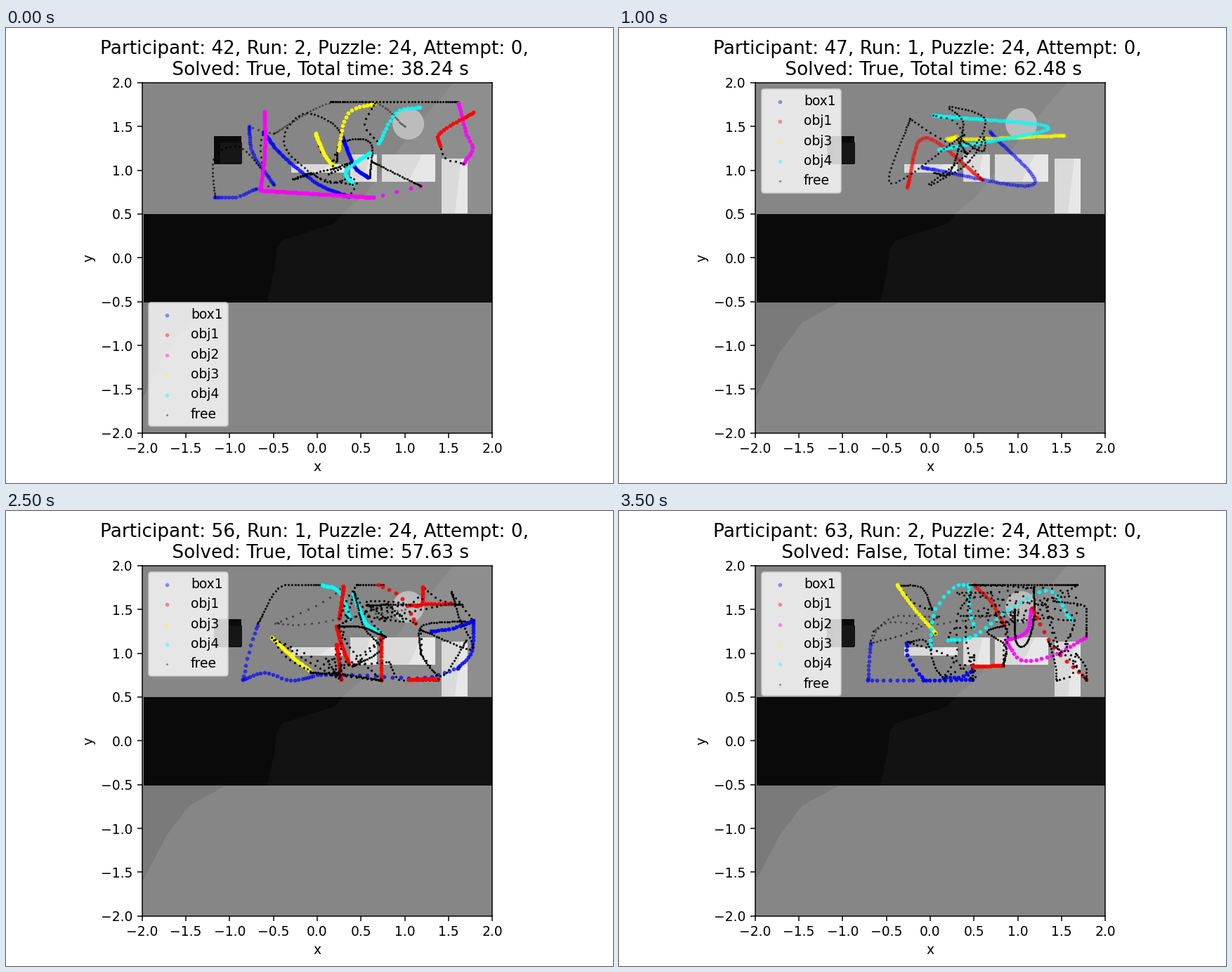
These frames come from a looping animation (864x648 px, 4 s). A matplotlib script:

```python
import numpy as np
import matplotlib.pyplot as plt
from matplotlib.animation import FuncAnimation

COLORS = {"box1": "blue", "obj1": "red", "obj2": "magenta",
          "obj3": "yellow", "obj4": "cyan", "free": "black"}
LOW, HIGH = (-1.2, .69), (1.78, 1.78)  # reachable area
UNIT = 124.7  # pixels per data unit

fig = plt.figure(figsize=(6.4, 4.8), dpi=135)
ax = fig.add_axes((193.6 / 864, 71.3 / 648, 498.8 / 864, 498.8 / 648))


def dots(name, x, y, alpha):
    size = .6 if name == "free" else 4.5
    return ax.scatter(x, y, s=size, color=COLORS[name], alpha=alpha)


def spline(p, steps=12):
    """Catmull-Rom curve through the points."""
    q = np.vstack([2 * p[0] - p[1], p, 2 * p[-1] - p[-2]])
    t = np.linspace(0, 1, steps, endpoint=False)[:, None]
    parts = []
    for a, b, c, d in zip(q, q[1:], q[2:], q[3:]):
        parts.append(b + t * (c - a) / 2 + t**2 * (2 * a - 5 * b + 4 * c - d) / 2
                     + t**3 * (3 * b - a - 3 * c + d) / 2)
    return np.vstack(parts + [p[-1:]])


class Hand:
    """Moves through the room and leaves dots that grow darker with time."""

    def __init__(self, seed):
        self.rng = np.random.default_rng(seed)
        self.at = np.array([1, 1.5])
        self.alpha = .35

    def trail(self, name, gap, points):
        p = spline(np.array(points, float))
        dist = np.r_[0, np.cumsum(np.hypot(*np.diff(p, axis=0).T))]
        u = np.linspace(0, 1, max(3, round(dist[-1] * UNIT / gap)))
        s = dist[-1] * (u + u * u * (3 - 2 * u)) / 2  # slower at both ends
        x = np.clip(np.interp(s, dist, p[:, 0]), LOW[0], HIGH[0])
        y = np.clip(np.interp(s, dist, p[:, 1]), LOW[1], HIGH[1])
        dots(name, x, y, self.alpha)
        self.at = p[-1]

    def move(self, name, gap, *points):
        """Reach for the first point when it is near, then follow the rest."""
        start = np.array(points[0], float)
        if .1 < np.hypot(*(start - self.at)) < 1:
            mid = (start + self.at) / 2 + self.rng.normal(0, .06, 2)
            self.trail("free", 6, [self.at, mid, start])
        self.trail(name, gap, points)
        self.alpha = min(.85, self.alpha + .07)

    def wander(self, name, gap, low, high, count):
        self.move(name, gap, *self.rng.uniform(low, high, (count, 2)))


def run_a(hand):
    move = hand.move
    move("free", 4, (1, 1.5), (.65, 1.78), (.1, 1.76), (-.5, 1.42))
    move("box1", 3, (-.78, 1.5), (-.74, 1.2), (-.5, .84))
    move("box1", 4, (-.7, .79), (-.95, .69), (-1.17, .69))
    move("free", 5, (-1.17, .69), (-1.18, 1.15), (-.9, 1.27), (-.62, 1))
    move("box1", 3, (-.62, 1.44), (-.4, 1.17), (0, .85), (.36, .7))
    move("free", 5, (.38, .92), (.1, .87), (-.33, 1.2), (-.36, 1.45),
         (-.15, 1.65), (.15, 1.55), (.28, 1.4))
    move("box1", 2, (.28, 1.4), (.42, 1.05), (.58, .92))
    move("free", 3, (.6, .92), (.6, 1.32), (.27, 1.32), (.22, 1.1))
    move("obj3", 2, (-.02, 1.42), (.07, 1.2), (.18, 1.05))
    move("obj3", 5, (.24, 1.23), (.35, 1.65), (.66, 1.77))
    move("obj4", 5, (.7, 1.31), (.9, 1.66), (1.17, 1.72))
    move("free", 4, (.15, 1.78), (1.1, 1.78), (1.6, 1.78))
    move("obj2", 4, (1.61, 1.77), (1.7, 1.42), (1.77, 1.25), (1.67, 1.08))
    move("obj1", 4, (1.4, 1.28), (1.4, 1.43), (1.78, 1.66))
    move("obj2", 3, (-.6, 1.67), (-.6, 1.2), (-.65, .78))
    move("obj2", 2, (-.65, .77), (0, .73), (.64, .69))
    move("obj2", 13, (.64, .69), (1.18, .82))
    move("free", 3, (1.18, .82), (.62, 1.1))
    move("obj4", 2, (.6, 1.2), (.33, 1), (.4, .84))
    hand.wander("free", 4, (-.3, .87), (.4, 1.1), 6)


def run_b(hand):
    move = hand.move
    move("free", 10, (1, 1.5), (.2, 1.65), (-.5, 1.6), (-1, 1.53))
    move("free", 9, (-1, 1.53), (-.8, 1.68), (-.2, 1.72))
    move("box1", 5, (-.68, 1.18), (-.35, 1.1), (-.14, .98), (-.06, .72))
    move("obj3", 2, (-.2, 1.78), (-.1, 1.6), (0, 1.45))
    move("obj3", 8, (0, 1.45), (.38, 1.17))
    move("obj1", 4, (0, 1.57), (.2, 1.57), (.1, 1.2), (0, .7))
    move("free", 6, (0, .7), (-.24, 1.05), (-.05, 1.4))
    move("free", 3, (-.03, 1.72), (.1, 1.2), (.5, .84))
    move("obj1", 3, (.43, 1.23), (.45, .69))
    move("free", 2, (.15, 1.28), (.4, 1.32), (1.2, 1.32))
    move("obj1", 2, (.54, 1.78), (.96, 1.77), (1.15, 1.5), (1.2, 1.33))
    move("free", 6, (1.15, 1.55), (1.3, 1.76), (1.53, 1.62), (1.45, .95), (1.3, .78))
    move("free", 3, (1.1, 1.53), (1.5, 1.5), (1.54, 1.28))
    move("obj1", 3, (1.19, 1.05), (1.19, .74))
    move("obj4", 2, (.57, .81), (.87, .69), (1.18, .77))
    move("obj4", 4, (.9, .69), (1.4, .72), (1.68, .81))
    hand.wander("free", 3, (.75, .7), (1.65, .8), 5)
    move("free", 3, (-.06, 1.15), (-.3, 1.2), (-.6, 1.1), (-.73, .86))
    move("box1", 4, (-.73, .86), (-.2, .78), (.57, .77))
    move("free", 3, (.57, .78), (.56, 1.15), (.38, 1.15))
    for x in np.linspace(-.08, 0, 3):
        move("free", 2, (x, 1.7), (x + .05, 1.35), (.35 + x, .9))


def run_d(hand):
    move = hand.move
    move("free", 6, (-.65, 1.27), (-.2, 1.4), (.4, 1.5))
    move("box1", 7, (-.65, 1.27), (-.25, 1.18), (.2, 1))
    move("obj4", 3, (.29, 1.32), (.3, 1.77), (.7, 1.78), (.82, 1.7))
    move("obj3", 2, (-.2, 1.23), (-.16, 1.72), (-.05, 1.78), (.35, 1.78))
    move("box1", 3, (.2, .95), (.5, .88), (.62, .7))
    move("free", 5, (.1, 1.05), (.3, 1.2), (.45, .95), (.73, .69))
    hand.wander("free", 4, (0, 1.4), (.9, 1.78), 18)
    move("obj1", 2, (.5, 1.45), (.8, 1.38), (1, 1.22))
    move("obj1", 2, (.5, 1.2), (.8, 1.26), (1, 1.22))
    move("obj3", 3, (.7, 1.7), (.72, 1.5), (.82, 1.42))
    move("box1", 3, (.96, 1.77), (1, 1.5), (1.05, 1.2))
    move("box1", 2, (.75, .85), (.95, .78), (1.08, .69))
    hand.wander("obj2", 2, (.75, .85), (1.2, .95), 14)
    move("free", 3, (1.15, 1.2), (1.35, 1.38), (1.6, 1.43))
    move("free", 5, (1.6, 1.43), (1.7, 1.4), (1.6, 1.28), (1.58, 1.57), (1.15, 1.5))
    move("free", 2, (.55, 1.78), (1.03, 1.78))
    move("free", 2, (.96, 1.7), (1, 1.2), (1.2, .9), (1.03, .7))
    for x in np.linspace(.46, .54, 3):
        move("free", 2, (.68, 1.7), (x, 1.4), (x + .02, 1.2), (x + .1, .72))
    move("free", 2, (.5, 1.25), (.72, 1.05), (.73, .69))


def run_e(hand):
    move = hand.move
    move("obj1", 6, (.3, 1.65), (-.2, 1.72), (-.7, 1.73))
    move("obj1", 3, (-.72, 1.73), (-.62, 1.45), (-.56, 1.16))
    hand.wander("obj1", 4, (-.7, 1.2), (-.52, 1.5), 4)
    move("obj1", 9, (-.58, 1.5), (0, 1.58), (.6, 1.65))
    move("obj1", 6, (.28, 1.47), (.5, 1.4), (1.05, 1.24))
    move("free", 8, (-.68, 1.48), (-.3, 1.34), (.1, 1.23), (.45, 1.34), (.86, 1.62))
    move("box1", 9, (-.7, 1.3), (-.68, 1), (-.78, .7))
    move("box1", 6, (-.74, .88), (-.5, .72))
    move("free", 2, (-.48, 1.28), (-.45, .95), (-.3, .78), (.22, .76))
    move("obj3", 4, (-.05, 1.58), (-.05, 1.2), (-.1, .7))
    move("obj3", 6, (-.36, .7), (-.36, .84), (-.05, .85))
    move("box1", 16, (-.5, .69), (.95, .69))
    move("free", 8, (.2, .75), (.9, .74))
    move("box1", 7, (.46, .92), (.75, 1.25), (.95, 1.6))
    move("obj4", 2, (.75, .7), (.74, 1), (1.3, .88))
    move("obj4", 4, (.75, .9), (1.05, .95), (1, 1.1))
    move("box1", 2, (1.04, 1.06), (1.03, .85), (1.08, .7))
    hand.wander("box1", 7, (.85, .8), (1.4, 1.6), 6)
    move("obj2", 3, (.29, 1.48), (.32, 1.65), (.52, 1.78), (.9, 1.78))
    hand.wander("obj2", 5, (.5, 1.35), (.95, 1.78), 9)
    hand.wander("obj2", 6, (1.2, .69), (1.75, 1.78), 14)
    move("obj2", 4, (1.1, 1.78), (1.55, 1.78), (1.5, 1.1), (1.58, .7), (1.3, .7))
    for x in (1, 1.07):
        move("free", 2, (x, 1.75), (x + .05, 1.4), (x, 1.1))
    for x in (-.71, -.57, .08, .9):
        move("free", 3, (x - .04, 1.78), (x + .04, 1.78))
    hand.wander("free", 7, (.85, .75), (1.75, 1.78), 30)


def run_f(hand):
    move = hand.move
    move("free", 8, (1, 1.5), (.3, 1.4), (-.15, 1.33), (-.48, 1.34))
    move("free", 9, (-.46, 1.35), (0, 1.55), (.3, 1.76))
    move("box1", 7, (-.68, 1.32), (-.76, 1.1), (-.85, .7))
    move("box1", 5, (-.85, .7), (-.6, .78), (-.3, .69), (-.05, .74))
    move("box1", 9, (0, .76), (.5, .75), (1.2, .72), (1.6, .83))
    move("box1", 4, (1.6, .83), (1.76, 1.02), (1.78, 1.37))
    move("free", 4, (-.68, 1.34), (-.42, 1.76), (.05, 1.78))
    move("obj4", 3, (.06, 1.78), (.25, 1.7), (.38, 1.38))
    move("obj1", 2, (.3, 1.77), (.25, 1.4))
    move("free", 3, (.45, 1.78), (.75, 1.78))
    move("obj1", 9, (.7, 1.78), (.95, 1.65), (1.12, 1.34))
    move("free", 3, (.56, 1.55), (1, 1.56), (1.65, 1.56))
    move("obj1", 3, (1.2, 1.76), (1.19, 1.56), (1.06, 1.55))
    move("obj1", 4, (1.2, 1.57), (1.53, 1.57))
    hand.wander("free", 6, (.15, 1.35), (1.1, 1.6), 8)
    move("obj1", 2, (.22, 1.31), (.28, 1.08), (.36, .88))
    move("obj1", 2, (.22, 1.1), (.27, .7))
    move("obj3", 2, (-.52, 1.18), (-.25, .93), (-.08, .8))
    move("free", 8, (-.52, 1.18), (0, .92), (.26, .73))
    move("obj4", 2, (.41, 1.68), (.55, 1.35), (.74, 1.22))
    move("free", 3, (.42, 1.7), (.53, 1.3), (.72, 1.05), (.4, .85))
    move("obj1", 4, (.73, 1.19), (.73, .69))
    move("free", 3, (-.08, .78), (.3, .76), (.74, .69))
    move("free", 2, (.23, 1.31), (.5, 1.3), (.78, 1.19))
    hand.wander("free", 4, (.1, .7), (.33, .95), 7)
    move("free", 5, (.82, .9), (.95, .69), (1.38, .69))
    move("obj1", 2, (1.04, .7), (1.38, .71))
    move("free", 3, (1.18, 1), (1.18, 1.3), (1.5, 1.36), (1.77, 1.36))
    move("box1", 4, (1.3, 1.25), (1.55, 1.29), (1.78, 1.37))
    move("free", 4, (1.53, 1.7), (1.62, 1.4), (1.76, 1.05), (1.18, 1.27))
    move("free", 4, (1.18, 1), (1.3, .82), (1.45, .76), (1.7, 1.15))


def run_h(hand):
    move = hand.move
    move("free", 7, (1, 1.5), (.5, 1.4), (0, 1.33), (-.5, 1.35), (-.68, 1.15))
    move("free", 6, (-.65, 1.25), (-.4, 1.42), (.1, 1.42))
    move("box1", 5, (-.68, 1.12), (-.7, .9), (-.71, .7))
    move("box1", 7, (-.71, .69), (-.2, .69))
    move("obj1", 4, (.5, 1.78), (.7, 1.58), (.84, 1.32))
    hand.wander("free", 10, (.3, 1.35), (1.6, 1.75), 18)
    move("free", 3, (-.38, 1.78), (-.1, 1.75), (.02, 1.5))
    move("obj3", 4, (-.38, 1.78), (-.2, 1.53), (.06, 1.23))
    move("obj4", 8, (0, 1.06), (.02, 1.4), (.12, 1.6), (.3, 1.78), (.47, 1.78))
    move("obj4", 7, (.44, 1.76), (.45, 1.5), (.5, 1.3))
    move("obj4", 8, (.2, 1.15), (.5, 1.2), (.9, 1.5), (1.35, 1.72), (1.6, 1.38))
    move("obj2", 3, (1.15, 1.5), (1.1, 1.25), (.87, 1.15))
    move("obj2", 6, (.87, 1.12), (1.05, .92), (1.4, .98), (1.77, 1.18))
    move("free", 4, (1.78, 1.2), (1.78, 1.52), (1.4, 1.6))
    move("box1", 6, (-.27, 1.12), (-.25, .95), (-.08, .7))
    move("box1", 6, (-.08, .69), (.48, .7))
    move("free", 4, (-.26, 1.13), (-.05, 1.14), (.05, .85), (.16, .7))
    move("box1", 5, (.15, .72), (.35, .73), (.48, .8))
    move("free", 8, (.46, 1.7), (.3, 1.4), (.3, 1), (.15, .72))
    move("free", 4, (.5, .98), (.48, .69))
    move("obj1", 2, (.48, .85), (.83, .86))
    move("free", 3, (.85, 1.32), (.65, 1.25), (.86, 1.08), (.83, .86))
    move("free", 2, (.96, 1.5), (.98, 1.12), (1.1, 1.12), (1.18, 1.4), (1.18, 1.75))
    move("free", 3, (.45, 1.78), (1.68, 1.78))
    move("obj1", 10, (1.16, 1.52), (1.4, 1.08), (1.78, .7))
    move("free", 4, (1.35, 1.13), (1.42, .9), (1.44, .69))
    move("free", 4, (1.66, 1), (1.77, .85), (1.78, .69))
    hand.wander("free", 9, (1.2, .85), (1.7, 1.7), 7)


def errands(hand, names):
    """Carry each thing once along a random path."""
    for name in names:
        gap = 5 if name == "free" else 3
        hand.wander(name, gap, (-.7, .75), (1.6, 1.7), 3)
    hand.wander("free", 4, (-.1, .8), (.7, 1.75), 14)


ALL = list(COLORS)
NO_2 = [n for n in ALL if n != "obj2"]
FEW = [n for n in NO_2 if n != "obj4"]
SCENES = [
    (run_a, 42, 2, 0, True, 38.24, ALL),
    (run_b, 39, 1, 0, True, 51.75, NO_2),
    (lambda hand: errands(hand, NO_2), 47, 1, 0, True, 62.48, NO_2),
    (run_d, 58, 1, 1, True, 111.39, ALL),
    (run_e, 63, 1, 0, False, 105.25, ALL),
    (run_f, 56, 1, 0, True, 57.63, NO_2),
    (lambda hand: errands(hand, FEW), 54, 2, 0, True, 43.16, FEW),
    (run_h, 63, 2, 0, False, 34.83, ALL),
]


def shade(color, *points):
    ax.fill(*np.transpose(points), color=color, lw=0, zorder=0)


def rect(color, x0, y0, x1, y1):
    shade(color, (x0, y0), (x1, y0), (x1, y1), (x0, y1))


def block(x0, y0, x1, y1):
    """Pale block with a light patch at the lower right."""
    rect("#dadada", x0, y0, x1, y1)
    mid = (x0 + x1) / 2
    shade("#e7e7e7", (mid, y0), (x1, y0), (x1, y1), (mid + (x1 - x0) / 4, y1))


def room():
    rect("#868686", -2, -2, 2, 2)
    shade("#8e8e8e", (1.56, 2), (2, 2), (2, .5), (.28, .5), (.54, .72), (1.1, 1.46))
    rect("#0a0a0a", -1.98, -.51, 2, .5)
    shade("#121212", (-.57, -.51), (-.49, -.14), (-.46, .11), (-.4, .2),
          (.19, .39), (.3, .5), (2, .5), (2, -.51))
    shade("#7a7a7a", (-2, -.51), (-1.04, -.51), (-1.46, -.74), (-1.72, -1.08), (-2, -1.62))
    rect("#0a0a0a", -1.18, 1.07, -.87, 1.39)
    rect("#161616", -1.11, 1.08, -.86, 1.32)
    for box in ((-.3, .97, .31, 1.07), (.38, .87, .68, 1.18),
                (.74, .87, 1.35, 1.18), (1.42, .51, 1.72, 1.13)):
        block(*box)
    ax.add_patch(plt.Circle((1.04, 1.53), .18, color="#bcbcbc", lw=0, zorder=0))


def draw(i):
    for old in list(ax.collections):
        old.remove()
    run, person, number, attempt, solved, seconds, names = SCENES[i]
    run(Hand(i))
    keys = [dots(n, [], [], .3) for n in names]
    ax.legend(keys, names, loc="upper left" if i else "lower left")
    ax.set_title(f"Participant: {person}, Run: {number}, Puzzle: 24, Attempt: {attempt}, \n"
                 f" Solved: {solved}, Total time: {seconds:.2f} s", fontsize=14)
    return []


room()
ticks = np.arange(-2, 2.1, .5)
ax.set(xlim=(-2, 2), ylim=(-2, 2), xlabel="x", ylabel="y", aspect="equal",
       xticks=ticks, yticks=ticks)
anim = FuncAnimation(fig, draw, frames=len(SCENES), interval=500, repeat=True)
plt.show()
```
